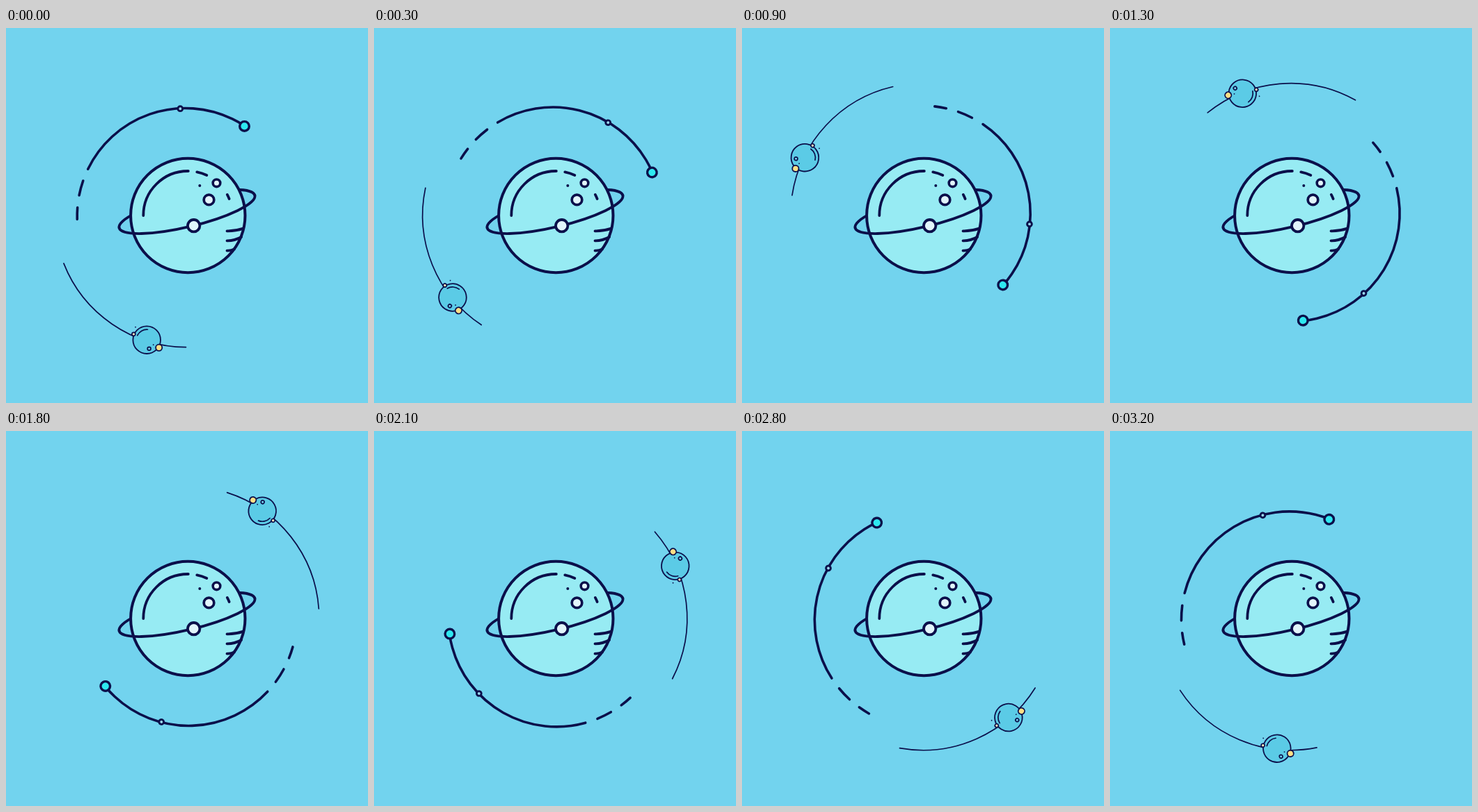
An HTML page with a canvas that plays this animation: 520x540 px, repeating every 3.3 s.

```html
<!DOCTYPE html>
<html lang="en">
<head>
<meta charset="utf-8">
<title>Planet and moons</title>
<style>
html, body { margin: 0; width: 100%; height: 100%; overflow: hidden; background: #72d3ee; }
canvas { display: block; }
</style>
</head>
<body>
<canvas id="stage" width="520" height="540"></canvas>
<script>
const ctx = document.getElementById('stage').getContext('2d');
const INK = '#0b0f4a', SKY = '#72d3ee', PALE = '#e2f5fb';
const STEP = 100, STEPS = 33;
const PIVOT = [259.8, 269.6];
// [step, degrees turned]; the orbit speed wavers slightly
const TURN = [[0, 0], [6, 66.7], [12, 129.9], [13, 140.6], [18, 197.3],
  [24, 260.1], [28, 301.5], [30, 326.5], [32, 348.3], [33, 360]];
const rad = deg => deg * Math.PI / 180;

function turnAt(step) {
  const i = TURN.findIndex(key => key[0] > step);
  const [s0, a0] = TURN[i - 1], [s1, a1] = TURN[i];
  return a0 + (a1 - a0) * (step - s0) / (s1 - s0);
}

function stroke(width) {
  ctx.lineWidth = width;
  ctx.stroke();
}

function arc(x, y, r, from, to, width) {
  ctx.beginPath();
  ctx.arc(x, y, r, rad(from), rad(to));
  stroke(width);
}

function disc(x, y, r, fill, width) {
  ctx.beginPath();
  ctx.arc(x, y, r, 0, 7);
  ctx.fillStyle = fill;
  ctx.fill();
  if (width) stroke(width);
}

function ring(from, to) {
  ctx.beginPath();
  ctx.ellipse(260, 264.4, 100.2, 21.9, rad(-13.5), rad(from), rad(to));
  stroke(3.8);
}

function bigPlanet() {
  const x = 261.3, y = 270;
  ring(180, 360);
  disc(x, y, 82.2, '#97ebf3', 4);
  for (const [from, to] of [[180, 270.5], [-78.3, -65], [-28, -22]]) arc(x, y, 64, from, to, 3.8);
  for (const [top, endX, endY] of [[292.3, 341, 288.6], [306.3, 338, 301], [320.6, 328, 318.6]]) {
    ctx.beginPath();
    ctx.moveTo(317.5, top);
    ctx.quadraticCurveTo((317.5 + endX) / 2, top + 0.3, endX, endY);
    stroke(3.8);
  }
  disc(278.3, 227, 2, INK);
  disc(302.5, 223.3, 5.3, PALE, 3.6);
  disc(291.5, 247.4, 7.3, PALE, 3.7);
  ring(0, 180);
  disc(269.7, 284.7, 8.7, PALE, 3.8);
}

function comet() {
  const x = 257.5, y = 270.8, r = 155.3;
  for (const [from, to] of [[178.3, 184.5], [191.1, 199.1], [205.8, 303.4]]) arc(x, y, r, from, to, 3.6);
  disc(250.3, 116.2, 3.4, '#9bd8ee', 2.9);
  disc(342.5, 141.4, 6.8, '#2ee8f0', 3.4);
}

function moon() {
  arc(...PIVOT, 190, 90.4, 158.6, 1.7);
  ctx.save();
  ctx.translate(202.2, 449.2);
  disc(0, 0, 19.8, '#5bcbe6', 1.8);
  arc(0, 0, 15, 206, 275, 1.7);
  disc(3.4, 12.5, 2.4, SKY, 1.7);
  disc(9.5, 7, 0.9, INK);
  disc(-16.2, -18.5, 0.9, INK);
  disc(-18.8, -8.4, 2.5, '#fde6bb', 1.7);
  disc(17.5, 11.1, 4.6, '#fedf86', 1.8);
  ctx.restore();
}

function draw(now) {
  const step = Math.floor(now / STEP) % STEPS;
  ctx.fillStyle = SKY;
  ctx.fillRect(0, 0, 520, 540);
  ctx.strokeStyle = INK;
  ctx.lineCap = 'round';
  bigPlanet();
  ctx.save();
  ctx.translate(...PIVOT);
  ctx.rotate(rad(turnAt(step)));
  ctx.translate(-PIVOT[0], -PIVOT[1]);
  comet();
  moon();
  ctx.restore();
}

const start = performance.now();
function tick() {
  draw(performance.now() - start);
  requestAnimationFrame(tick);
}
tick();
</script>
</body>
</html>
```
